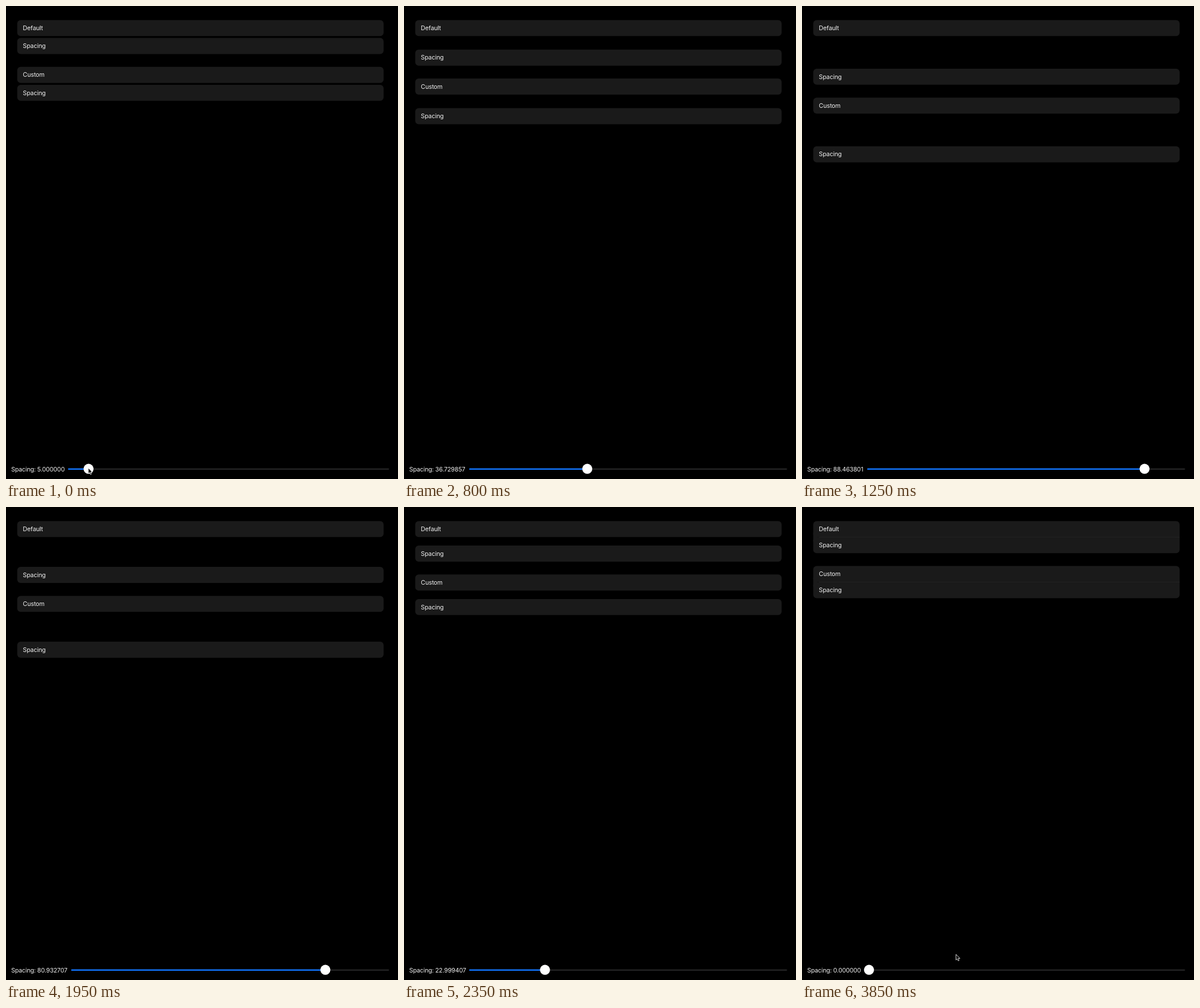
Write an HTML page that moves like this. It is 681x822 px and loops after 3900 ms.

```html
<!DOCTYPE html>
<html lang="en">
<head>
<meta charset="utf-8">
<title>List spacing</title>
<style>
  html, body { margin: 0; width: 100%; height: 100%; overflow: hidden; background: #000; }
  svg { display: block; }
  text { font: 10.6px Inter, "Open Sans", sans-serif; letter-spacing: -.16px; fill: #f0f0f0; }
</style>
</head>
<body>
<svg id="stage" width="681" height="822" viewBox="0 0 681 822"></svg>
<script>
const LOOP = 3900, STEP = 50;
const ROW = 27.9, SCALE = 0.64, LEFT = 19.5, WIDTH = 636.5, TOP = 24.4, SECTION_GAP = 22.4;
const TRACK_END = 665.5, THUMB = 8.7;

// [time, spacing]
const spacingKeys = [
  [0, 5], [100, 5], [550, 12.318274], [800, 36.729857], [1100, 74.613822],
  [1250, 88.463801], [1350, 95.127643], [1500, 100], [1900, 100], [1950, 80.932707],
  [2350, 22.999407], [2450, 7.582916], [2500, 3.127418], [2550, 0], [LOOP, 0]
];

const stage = document.getElementById('stage');

function set(node, attrs) {
  for (const name in attrs) node.setAttribute(name, attrs[name]);
  return node;
}

function add(tag, attrs, parent = stage) {
  const node = document.createElementNS('http://www.w3.org/2000/svg', tag);
  return parent.appendChild(set(node, attrs));
}

function addRow(title) {
  const row = add('g', {});
  add('rect', { x: LEFT, width: WIDTH, height: ROW, rx: 6, fill: '#1a1a1a' }, row);
  add('text', { x: 29.3, y: 17.7 }, row).textContent = title;
  return row;
}

function addSection(title) {
  const rows = [addRow(title), addRow('Spacing')];
  // Squares off the inner corners when the rows touch
  const seam = add('g', {});
  for (const x of [LEFT, LEFT + WIDTH - 7]) {
    add('rect', { x, y: -8, width: 7, height: 16, fill: '#1a1a1a' }, seam);
  }
  add('rect', { x: 29.5, y: -.4, width: 626.5, height: .8, fill: '#262626' }, seam);
  return { rows, seam };
}

const sections = ['Default', 'Custom'].map(addSection);
const label = add('text', { x: 9, y: 808.6 });
const track = add('rect', { y: 803.5, height: 2.6, rx: 1.3, fill: '#222223' });
const filled = add('rect', { y: 803.5, height: 2.6, rx: 1.3, fill: '#0f70f5' });
const thumb = add('circle', { cy: 804.3, r: THUMB, fill: '#fff' });
const pointer = add('path', {
  d: 'M0 0V9.7L2.2 7.6L3.7 11.2L5.4 10.5L3.9 7H6.9Z',
  fill: '#000', stroke: '#fff', 'stroke-width': .8
});

function spacingAt(t) {
  const i = spacingKeys.findIndex(key => key[0] > t);
  const [t0, a] = spacingKeys[i - 1], [t1, b] = spacingKeys[i];
  return a + (b - a) * (t - t0) / (t1 - t0);
}

function pointerAt(t) {
  if (t < 200) return [143 + t / 150, 803 + t / 30];
  if (t < 3150) return null;
  if (t >= 3850) return [267.5, 777.5];
  const rest = 1 - Math.min(1, (t - 3150) / 500);
  const k = 1 - rest * rest;
  return [1.5 + 262 * k, 793 - 14.5 * k];
}

const moveTo = (node, x, y) => set(node, { transform: `translate(${x} ${y})` });

function draw(t) {
  const spacing = spacingAt(t);
  const gap = spacing * SCALE;

  let y = TOP;
  for (const { rows, seam } of sections) {
    moveTo(rows[0], 0, y);
    moveTo(rows[1], 0, y + ROW + gap);
    moveTo(seam, 0, y + ROW);
    set(seam, { visibility: spacing ? 'hidden' : 'visible' });
    y += 2 * ROW + gap + SECTION_GAP;
  }

  label.textContent = 'Spacing: ' + spacing.toFixed(6);
  const start = spacing < 10 ? 107.7 : spacing < 100 ? 113.2 : 118.5;
  const x = start + THUMB + (TRACK_END - start - 2 * THUMB) * spacing / 100;
  set(track, { x: start, width: TRACK_END - start });
  set(filled, { x: start, width: x - start });
  set(thumb, { cx: x });

  const tip = pointerAt(t);
  set(pointer, { visibility: tip ? 'visible' : 'hidden' });
  if (tip) moveTo(pointer, ...tip);
}

const begin = performance.now();
function tick() {
  const t = (performance.now() - begin) % LOOP;
  draw(Math.floor(t / STEP) * STEP);
  requestAnimationFrame(tick);
}
tick();
</script>
</body>
</html>
```
